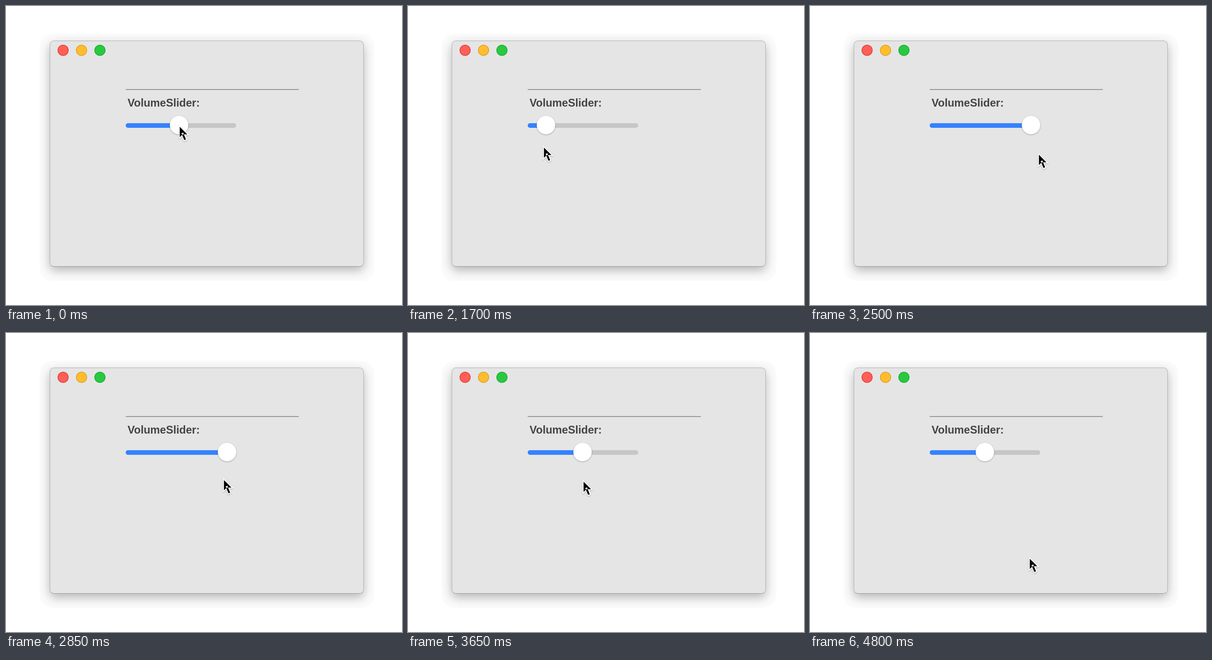
These frames come from a looping animation (860 px wide and 648 px high, 4.85 s). An HTML page:

```html
<!DOCTYPE html>
<html lang="en">
<head>
<meta charset="utf-8">
<title>Volume slider</title>
<style>
  html, body { margin: 0; width: 100%; height: 100%; overflow: hidden; background: #fff; }
  .halo, .window, svg { position: absolute; box-sizing: border-box; }
  .halo { left: 73px; top: 60px; width: 727px; height: 536px; border-radius: 28px; background: #fbfbfb; }
  .window {
    left: 95px; top: 75px; width: 682px; height: 490px; border-radius: 9px;
    background: #e5e5e5; border: 1px solid #b0b0b0; border-bottom-color: #979797;
    box-shadow: 0 8px 22px rgba(0, 0, 0, .28);
  }
  svg { left: 0; top: 0; }
  text { font: bold 23.6px "Liberation Sans", Arial, sans-serif; fill: #444; }
  #knob { filter: drop-shadow(0 1px 1.5px rgba(0, 0, 0, .3)); }
  #cursor { filter: drop-shadow(0 1.5px 1px rgba(0, 0, 0, .3)); }
</style>
</head>
<body>
<div class="halo"></div>
<div class="window"></div>
<svg width="860" height="648" viewBox="0 0 860 648">
  <g stroke-width="1.5">
    <circle cx="124" cy="96" r="11.25" fill="#ff5f57" stroke="#e0403a"/>
    <circle cx="164" cy="96" r="11.25" fill="#ffbd2e" stroke="#dfa023"/>
    <circle cx="204" cy="96" r="11.25" fill="#28c940" stroke="#1dad2f"/>
  </g>
  <rect x="260" y="180" width="376" height="2" fill="#989898"/>
  <text x="264" y="218">VolumeSlider:</text>
  <rect x="260" y="254" width="240" height="10" rx="5" fill="#c6c6c6"/>
  <rect id="level" x="260" y="254" width="120" height="10" rx="5" fill="#3482fe"/>
  <circle id="knob" cy="258" r="20" fill="#fff"/>
  <g id="cursor">
    <path fill="#fff" d="M0 0V32L7 25.4L11 36.4L18.2 33.4L14.2 23.2H23.2Z"/>
    <path d="M2 4.8V27.2L8 21.4L8.8 21.2H18.4ZM5.7 18.8L9.4 17.2L15.5 32L11.9 33.5Z"/>
  </g>
</svg>
<script>
  const LOOP = 4850, STEP = 50, KNOB_LAG = 25;

  const linear = u => u;
  const easeIn = u => 1 - Math.cos(u * Math.PI / 2);
  const easeOut = u => Math.sin(u * Math.PI / 2);
  const easeInOut = u => (1 - Math.cos(u * Math.PI)) / 2;

  // The pointer rests between moves.
  const rest = { x: 375.3, y: 257 };
  const moves = [
    { from: 1350, to: 1400, x: 364, y: 260.5, ease: linear },
    { from: 1400, to: 1900, x: 246, y: 329.5, ease: linear },
    { from: 1900, to: 2100, x: 295.3, y: 322.5, ease: easeIn },
    { from: 2100, to: 2650, x: 515, y: 317, ease: easeOut },
    { from: 2650, to: 3100, x: 409.3, y: 309.5, ease: easeInOut },
    { from: 3100, to: 3400, x: 368, y: 317.4, ease: easeOut },
    { from: 3500, to: 3650, x: 379.3, y: 317.4, ease: easeInOut },
    { from: 4500, to: 4800, x: 475.3, y: 484.4, ease: easeInOut }
  ];

  function pointerAt(t) {
    let { x, y } = rest;
    for (const move of moves) {
      if (t <= move.from) break;
      const k = move.ease(Math.min(1, (t - move.from) / (move.to - move.from)));
      x += (move.x - x) * k;
      y += (move.y - y) * k;
    }
    return { x, y };
  }

  // While dragged, the knob trails the pointer and stops at the track ends.
  function knobAt(t) {
    const x = pointerAt(Math.min(t, 3650 + KNOB_LAG) - KNOB_LAG).x + 0.5;
    return Math.min(480, Math.max(280, x));
  }

  const [level, knob, cursor] = ["level", "knob", "cursor"].map(id => document.getElementById(id));
  const start = performance.now();

  function draw(now) {
    const t = Math.floor(Math.max(0, now - start) % LOOP / STEP) * STEP;
    const { x, y } = pointerAt(t);
    const knobX = knobAt(t);
    knob.setAttribute("cx", knobX);
    level.setAttribute("width", knobX - 260);
    cursor.setAttribute("transform", `translate(${x} ${y})`);
    requestAnimationFrame(draw);
  }
  draw(start);
</script>
</body>
</html>
```
